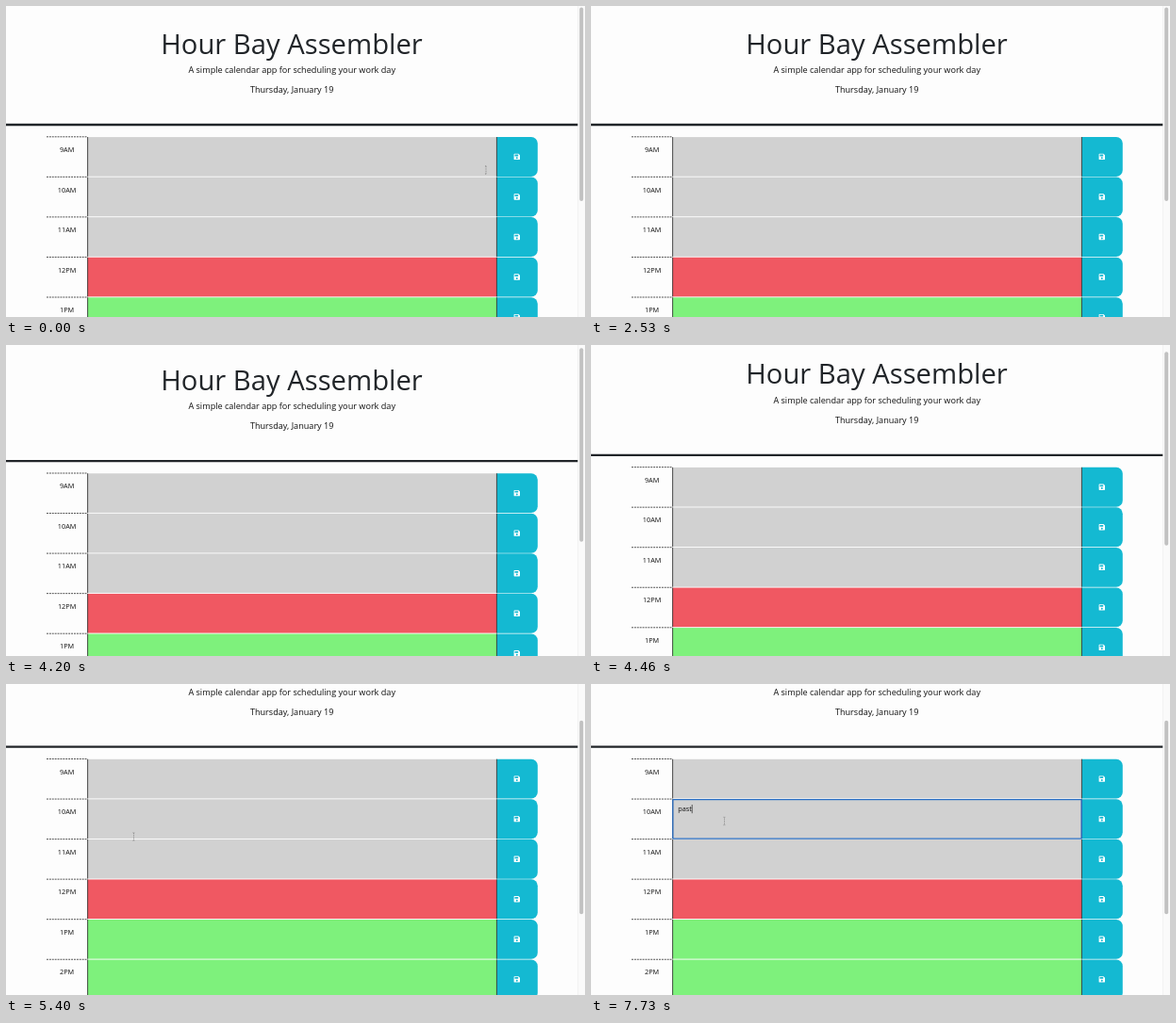
An HTML page that plays this animation: 614 px wide and 330 px high, repeating every 8000 ms.

```html
<!DOCTYPE html>
<html lang="en">
<head>
<meta charset="utf-8">
<title>Hour Bay Assembler</title>
<style>
  html, body { margin: 0; width: 614px; height: 330px; overflow: hidden; background: #fdfdfd; }
  svg { display: block; font: 7.3px "Open Sans", "Noto Sans", sans-serif; fill: #111; }
  .mid { text-anchor: middle; }
  .lead { font-size: 9.12px; }
</style>
</head>
<body>
<svg width="614" height="330" viewBox="0 0 614 330">
  <defs>
    <path id="disk" fill="#fff" fill-rule="evenodd"
      d="M-2.6-3.2H1.7L3.2-1.7V2.6Q3.2 3.2 2.6 3.2H-2.6Q-3.2 3.2-3.2 2.6V-2.6Q-3.2-3.2-2.6-3.2Z
         M-2.3-2.3V-.5H1.4V-2.3Z M-1 1.4a1 1 0 1 0 2 0a1 1 0 1 0-2 0Z"/>
  </defs>
  <g id="page">
    <text class="mid" x="303" y="50.5" font-size="29.2" fill="#212529">Hour Bay Assembler</text>
    <text class="mid lead" x="303.2" y="71.2">A simple calendar app for scheduling your work day</text>
    <text class="mid lead" x="303.2" y="92.1">Thursday, January 19</text>
    <path d="M0 126H606.5" stroke="#212529" stroke-width="2.3"/>
    <g id="rows"></g>
    <rect id="focus" x="86.8" y="181.9" width="433.4" height="41.6" rx=".8" fill="none" stroke="#2a6fc4" stroke-width="1.3"/>
    <text id="typed" x="92.3" y="194.2"></text>
    <path id="caret" stroke="#222" stroke-width=".7"/>
  </g>
  <path d="M606.8 0V330" stroke="#e8e8e8" stroke-width=".7"/>
  <rect x="607.2" width="6.8" height="330" fill="#fafafa"/>
  <rect id="thumb" x="608.2" width="4" height="205.5" rx="2" fill="#c1c1c1"/>
  <path id="beam" d="M-1-4.2H1M0-4V4M-1 4.2H1" fill="none" stroke="#777" stroke-width=".7" stroke-dasharray="1 .7"/>
</svg>
<script>
const LOOP = 8000, STEP = 200 / 3, PITCH = 42.55;
const $ = id => document.getElementById(id);
const hours = ['9AM', '10AM', '11AM', '12PM', '1PM', '2PM', '3PM'];
const fills = ['#d1d1d1', '#f05862', '#7ef17c'];

$('rows').innerHTML = hours.map((hour, i) => {
  const fill = fills[i < 3 ? 0 : i === 3 ? 1 : 2];
  return `<g transform="translate(0 ${138.8 + i * PITCH})">
    <path d="M43 0H86.5" stroke="#222" stroke-width=".8" stroke-dasharray="1.9 1"/>
    <text class="mid" x="64.6" y="16.2">${hour}</text>
    <rect x="86.5" y=".3" width="434" height="41.6" fill="${fill}"/>
    <path d="M520.5.2H557a6.8 6.8 0 0 1 6.8 6.8V35.3a6.8 6.8 0 0 1-6.8 6.8H520.5Z" fill="#14b9d2"/>
    <path d="M86.6.2V42M520.4.2V42" stroke="#222" stroke-width=".8"/>
    <use href="#disk" x="541.8" y="21.1"/>
  </g>`;
}).join('');

// Each point is [time, value, ...]; the ends hold.
function track(points, t) {
  const next = points.findIndex(p => p[0] > t);
  if (next === 0) return points[0].slice(1);
  if (next < 0) return points.at(-1).slice(1);
  const a = points[next - 1], b = points[next];
  const k = (t - a[0]) / (b[0] - a[0]);
  return a.slice(1).map((v, i) => v + (b[i + 1] - v) * k);
}

const scrollPath = [[3880, 0], [3933, .5], [4200, 2.8], [4333, 5], [4467, 9.2],
  [4533, 32], [4600, 54.3], [4667, 58], [4733, 59.3]];
const leavePath = [[0, 509, 174], [270, 530, 178]];
const enterPath = [[4800, 58, 196], [5100, 112, 172], [5400, 135.5, 162],
  [5740, 135.5, 162], [6200, 141.5, 145.5]];
const keyTimes = [7200, 7330, 7530, 7730];

function draw(t) {
  const tick = Math.floor((t + 7) / STEP) * STEP;
  const [scroll] = track(scrollPath, tick);
  $('page').setAttribute('transform', `translate(0 ${-scroll})`);
  $('thumb').setAttribute('y', 1.5 + scroll * .63);

  const [x, y] = track(t < 2000 ? leavePath : enterPath, tick);
  $('beam').setAttribute('transform', `translate(${x} ${y})`);
  $('beam').style.display = x > 88 && x < 519 ? '' : 'none';

  const count = keyTimes.filter(k => k <= t).length;
  $('typed').textContent = 'past'.slice(0, count);
  const end = 92.6 + (count ? $('typed').getComputedTextLength() : 0);
  $('caret').setAttribute('d', `M${end} 187.3V196.5`);
  $('focus').style.display = t >= 5660 ? '' : 'none';
  $('caret').style.display = t >= 6660 || (t >= 5660 && t < 6200) ? '' : 'none';
}

const start = performance.now();
function frame() {
  draw((performance.now() - start) % LOOP);
  requestAnimationFrame(frame);
}
frame();
</script>
</body>
</html>
```
